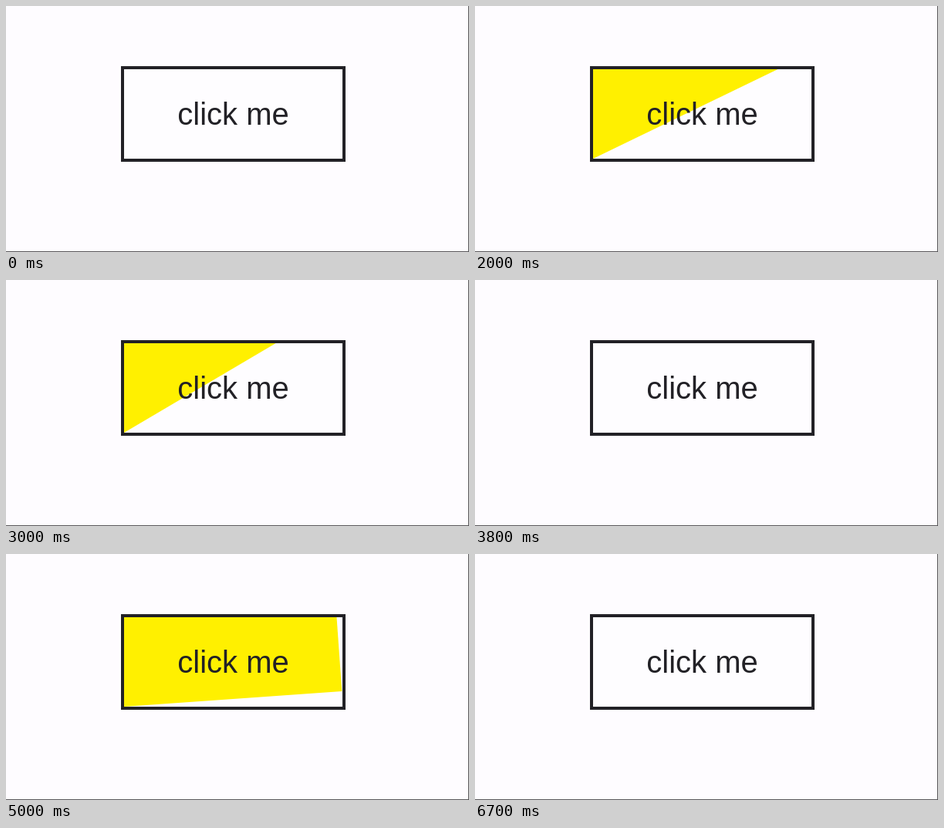
An HTML page with a canvas for the animation above (7.1 s loop, 600 by 319 pixels).

```html
<!DOCTYPE html>
<html lang="en">
<head>
<meta charset="utf-8">
<title>Button hover</title>
<style>
  html, body { margin: 0; width: 100%; height: 100%; overflow: hidden; }
  canvas { display: block; width: 600px; height: 319px; }
</style>
</head>
<body>
<canvas id="stage" width="600" height="319"></canvas>
<script>
const ctx = document.getElementById('stage').getContext('2d');
const LOOP = 7100;
const STEP = 100;
const DURATION = 1026;
const INNER = { x: 153, y: 82, w: 283, h: 116 };
const HOVERS = [
  { enter: 1567, leave: 2775 },
  { enter: 4246, leave: 5660 }
];

// cubic-bezier(.25, .1, .25, 1), solved by bisection
function ease(t) {
  if (t <= 0) return 0;
  if (t >= 1) return 1;
  let low = 0, high = 1;
  for (let i = 0; i < 24; i++) {
    const u = (low + high) / 2;
    if (0.75 * u * (1 - u) + u ** 3 < t) low = u;
    else high = u;
  }
  const u = low, v = 1 - low;
  return 0.3 * u * v * v + 3 * u * u * v + u ** 3;
}

function fillAmount(time) {
  return HOVERS.reduce((sum, { enter, leave }) =>
    sum + ease((time - enter) / DURATION) - ease((time - leave) / DURATION), 0);
}

function rect(color, x, y, w, h) {
  ctx.fillStyle = color;
  ctx.fillRect(x, y, w, h);
}

function drawPanel(amount) {
  const { x, y, w, h } = INNER;
  if (amount < 0.001) return;
  ctx.save();
  ctx.beginPath();
  ctx.rect(x, y, w, h);
  ctx.clip();
  ctx.translate(x, y + h);
  ctx.rotate(-Math.PI / 2 * (1 - amount));
  rect('#fff000', 0, -h, w, h);
  ctx.restore();
}

function draw(time) {
  rect('#fefcff', 0, 0, 600, 319);
  rect('#58575a', 599, 0, 1, 319);
  rect('#58575a', 0, 318, 600, 1);

  rect('#222126', 149, 78, 291, 124);
  rect('#fefdff', INNER.x, INNER.y, INNER.w, INNER.h);
  drawPanel(fillAmount(time));

  ctx.fillStyle = '#222126';
  ctx.font = '40px "Liberation Sans", Arial, sans-serif';
  ctx.textAlign = 'center';
  ctx.fillText('click me', 294.5, 154);
}

const start = performance.now();
function tick() {
  const time = (performance.now() - start) % LOOP;
  draw(Math.floor(time / STEP) * STEP);
  requestAnimationFrame(tick);
}
tick();
</script>
</body>
</html>
```
